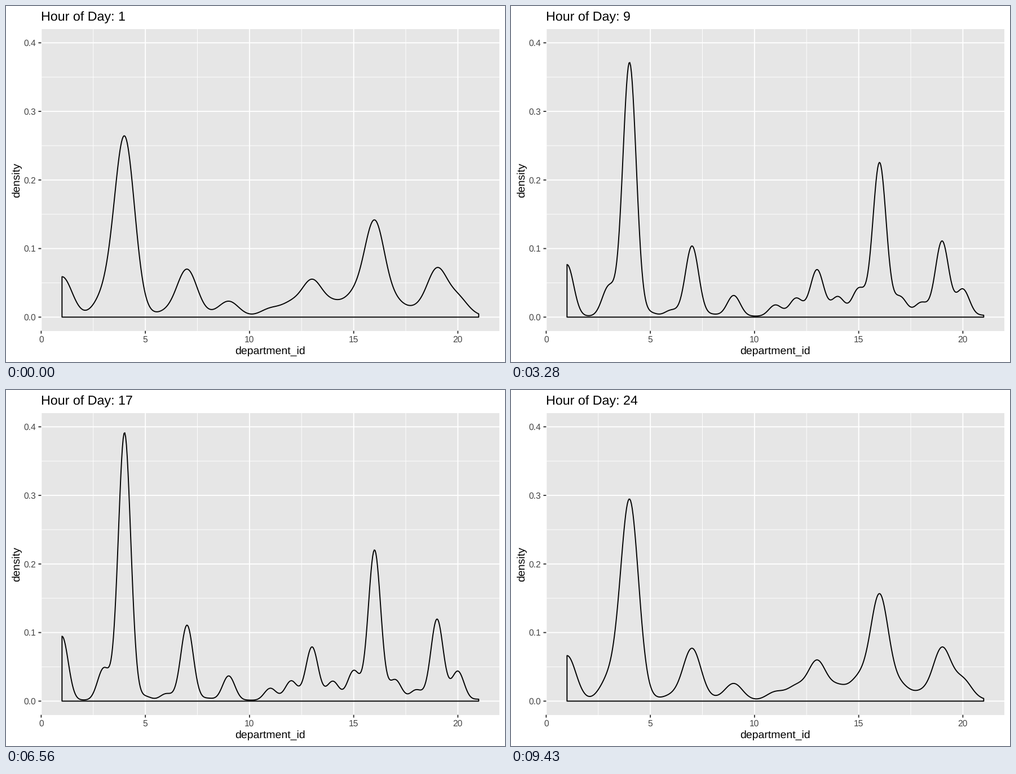
A matplotlib script for the animation above (9840 ms loop, 885 px wide and 632 px high).

```python
import matplotlib.pyplot as plt
import numpy as np
from matplotlib.animation import FuncAnimation
from matplotlib.patches import Polygon, Rectangle

W, H, DPI = 885, 632, 100
HOURS, STEP_MS = 24, 410
LEFT, RIGHT, TOP, BOTTOM = 62.4, 875.3, 41.0, 576.7
INK, TICK, LABEL, PANEL = "black", "#333333", "#444444", "#e6e6e6"

plt.rcParams["font.family"] = "Liberation Sans"
plt.rcParams["text.hinting"] = "no_hinting"

DEPTS = np.arange(1, 22)
GRID = np.linspace(1, 21, 512)

# Usual share of each department, in percent
SHARE = np.array([7.05, 0.1, 3.55, 29.25, 0.5, 0.8, 8.3, 0.3, 2.75, 0.1, 1.4,
                  2.2, 5.9, 2.15, 3.3, 16.45, 2.3, 1.2, 8.95, 3.25, 0.2])

# Time of day -> relative change of a department's share around it
SWINGS = {
    0.5: {3: -0.07, 4: 0.08, 5: -0.4, 13: 0.05, 19: -0.08},
    5: {1: 0.13, 5: -0.6, 7: 0.12, 9: 0.1, 11: 0.35, 17: 0.2, 19: -0.15},
    9: {1: -0.13, 4: 0.02, 9: -0.08, 13: -0.06, 14: 0.1, 16: 0.1, 18: 0.4},
    21: {1: 0.08, 7: -0.06, 16: 0.02, 18: 0.3, 19: -0.05},
}


def bump(hour, peak, width, power=2):
    """Bell of height 1 on the 24-hour clock."""
    gap = abs((hour - peak + 12) % 24 - 12)
    return np.exp(-(gap / width) ** power)


def bandwidth(hour):
    """Few night orders smooth the curve; a milder bell covers the evening."""
    return 0.293 + 0.355 * bump(hour, 4.25, 3.13, 2.25) + 0.095 * bump(hour, 23, 3.5)


def shares(hour):
    result = SHARE / 100
    for peak, swing in SWINGS.items():
        for dept, change in swing.items():
            result[dept - 1] *= 1 + change * bump(hour, peak, 2.2)
    return result


def density(hour):
    h = bandwidth(hour)
    z = (GRID[:, None] - DEPTS) / h
    return np.exp(-z * z / 2) @ shares(hour) / (h * np.sqrt(2 * np.pi))


def px(x):
    return LEFT + (RIGHT - LEFT) * np.asarray(x) / 22


def py(y):
    return BOTTOM - (BOTTOM - TOP) * (np.asarray(y) + 0.02) / 0.44


def points(pixels):
    return pixels * 72 / DPI


fig = plt.figure(figsize=(W / DPI, H / DPI), dpi=DPI, facecolor="white")
ax = fig.add_axes([0, 0, 1, 1])
ax.set_xlim(0, W)
ax.set_ylim(H, 0)
ax.axis("off")

panel = Rectangle((LEFT, TOP), RIGHT - LEFT, BOTTOM - TOP, fc=PANEL, ec="none", zorder=0)
ax.add_patch(panel)


def line(xs, ys, color, width, z):
    return ax.plot(xs, ys, color=color, lw=points(width), zorder=z,
                   solid_capstyle="butt", snap=False)[0]


def label(x, y, text, size, color=INK, ha="center", rotation=0):
    return ax.text(x, y, text, fontsize=points(size), color=color, ha=ha,
                   va="baseline", rotation=rotation, rotation_mode="anchor")


def grid(xs, ys, width, z):
    for x in px(xs):
        line([x, x], [TOP, BOTTOM], "white", width, z).set_clip_path(panel)
    for y in py(ys):
        line([LEFT, RIGHT], [y, y], "white", width, z)


major_x, major_y = np.arange(0, 21, 5), np.arange(5) / 10
grid(np.arange(2.5, 20, 5), np.arange(0.05, 0.4, 0.1), 0.95, 1)
grid(major_x, major_y, 1.9, 2)

for v in major_x:
    line([px(v)] * 2, [BOTTOM, BOTTOM + 4.9], TICK, 1.9, 3)
    label(px(v), 596.6, str(v), 15.6, LABEL)
for v in major_y:
    line([LEFT - 4.9, LEFT], [py(v)] * 2, TICK, 1.9, 3)
    label(53.6, py(v) + 5.6, f"{v:.1f}", 15.6, LABEL, ha="right")

label((LEFT + RIGHT) / 2, 618.4, "department_id", 19.5)
label(24, (TOP + BOTTOM) / 2, "density", 19.5, rotation=90)
title = label(61.5, 26.6, "", 23.2, ha="left")

curve = Polygon([(0, 0), (1, 1)], closed=True, fill=False, ec=INK, lw=points(1.9),
                joinstyle="round", snap=False, zorder=4)
ax.add_patch(curve)


def draw(i):
    hour = i + 1
    x = px(np.r_[GRID, 21, 1])
    y = py(np.r_[density(hour), 0, 0])
    curve.set_xy(np.column_stack([x, y]))
    title.set_text(f"Hour of Day: {hour}")
    return curve, title


anim = FuncAnimation(fig, draw, frames=HOURS, interval=STEP_MS, repeat=True, repeat_delay=0)
plt.show()
```
